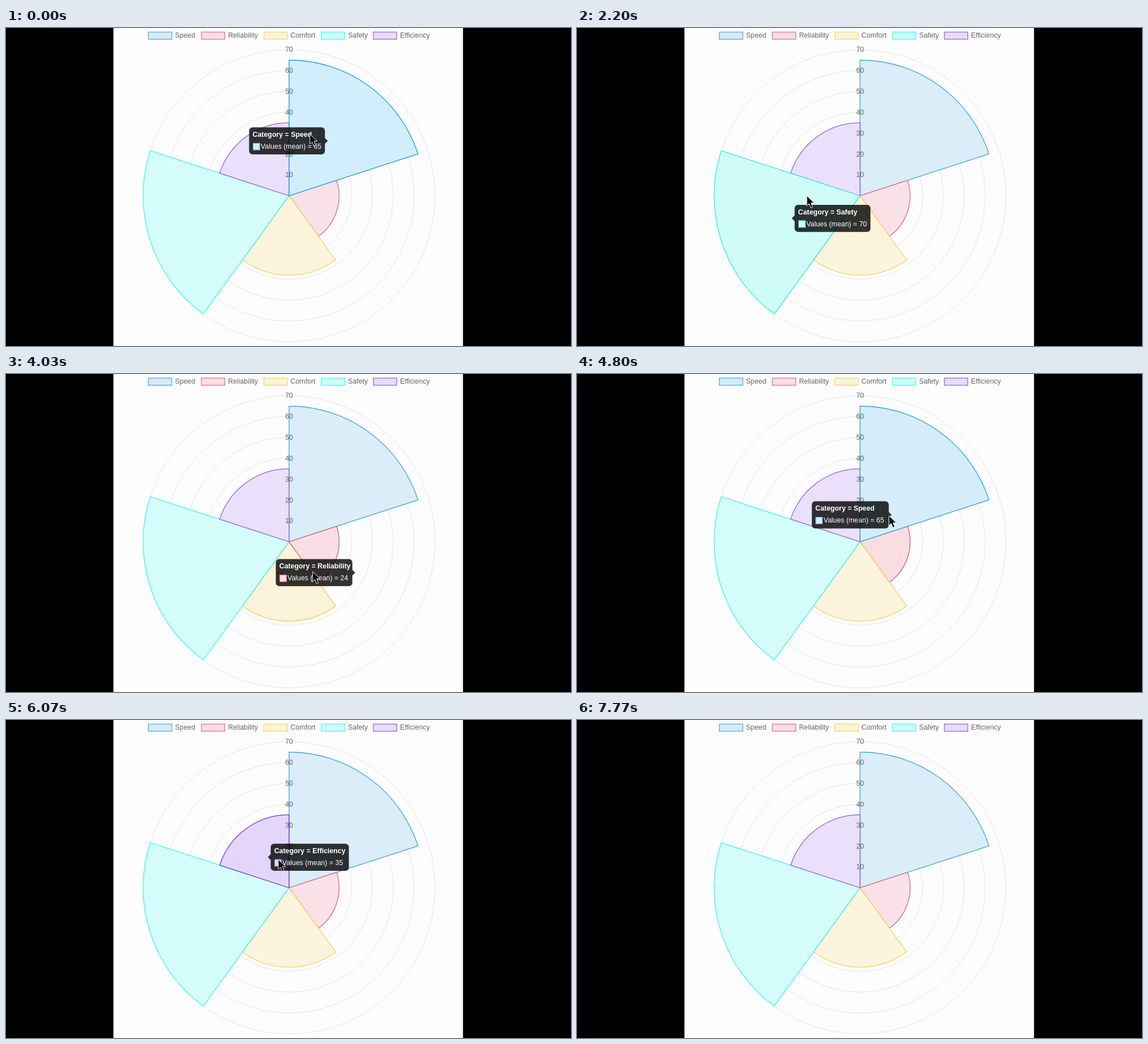
Write an HTML page that moves like this. It is 998x561 px and loops after 7800 ms.

```html
<!DOCTYPE html>
<html lang="en">
<head>
<meta charset="utf-8">
<title>Polar area chart</title>
<style>
  html, body { margin: 0; width: 100%; height: 100%; overflow: hidden; background: #000; }
  svg { display: block; width: 998px; height: 561px; }
  text { font: 12.35px "Liberation Sans", Arial, sans-serif; fill: #666; }
  .tip text { fill: #fff; }
  .tip .title { font-weight: bold; }
  .ring { fill: none; stroke: #000; stroke-opacity: .1; }
  .sector { stroke-width: 1.3; stroke-linejoin: bevel; }
</style>
</head>
<body>
<svg viewBox="0 0 998 561">
  <rect x="189.5" width="618" height="561" fill="#fdfdfd"/>
  <g id="legend"></g>
  <g id="rings"></g>
  <g id="sectors"></g>
  <g id="ticks" text-anchor="middle"></g>
  <g id="tip" class="tip">
    <path id="bubble" fill-opacity=".8"/>
    <text id="title" class="title" x="6.2" y="16.7"></text>
    <rect x="6.6" y="27.6" width="12.6" height="12.6" fill="#fff"/>
    <rect id="swatch" x="7.1" y="28.1" width="11.6" height="11.6"/>
    <text id="value" x="20.6" y="37.8"></text>
  </g>
  <path id="cursor" d="M0 0V17.5L4 13.8L7 21.2L10.3 19.8L7.4 12.6L12.8 12.3Z"
        fill="#0a0a0a" stroke="#fff" stroke-width=".9"/>
  <path d="M0 0H189.5V561H0ZM807.5 0H998V561H807.5Z"/>
</svg>
<script>
const LOOP = 7800, CX = 500, CY = 296, UNIT = 3.683, TIP_H = 47.8;

// fill and stroke: normal, then hovered
const sectors = [
  { name: 'Speed', value: 65, legendX: 251, fill: [[214, 235, 247], [204, 235, 253]], line: [[66, 165, 215], [26, 156, 222]] },
  { name: 'Reliability', value: 24, legendX: 344.6, fill: [[250, 221, 229], [251, 211, 217]], line: [[214, 110, 130], [204, 72, 104]] },
  { name: 'Comfort', value: 38, legendX: 455, fill: [[252, 243, 216], [251, 241, 212]], line: [[241, 211, 100], [238, 200, 60]] },
  { name: 'Safety', value: 70, legendX: 556.6, fill: [[208, 253, 252], [202, 252, 247]], line: [[64, 244, 236], [52, 235, 222]] },
  { name: 'Efficiency', value: 35, legendX: 648.4, fill: [[232, 220, 252], [225, 209, 251]], line: [[145, 98, 204], [108, 54, 200]] },
];

// [time, sector under the pointer], -1 for none
const hovers = [[-1000, 0], [150, 4], [1450, 3], [2930, 2], [4000, 1], [4728, 0],
  [5850, 4], [6790, 0], [6965, -1]];

// [time, x, y] of the pointer tip
const track = [[0, 537, 187], [150, 499, 211], [470, 486, 227], [1000, 447, 246],
  [1500, 419, 271], [2200, 406, 296], [2600, 416, 335], [2930, 455, 356], [3230, 463, 354],
  [3650, 500, 372], [4000, 539, 351], [4400, 564, 315], [4720, 556, 276], [4800, 551, 250],
  [5200, 553, 212], [5850, 500, 231], [6070, 481, 246], [6450, 456, 260], [6650, 460, 258],
  [6790, 500, 240], [6920, 640, 190], [6990, 740, 172], [7040, 840, 160]];

const $ = id => document.getElementById(id);
const lerp = (a, b, p) => a + (b - a) * p;
const easeOutQuart = p => 1 - (1 - p) ** 4;
const clamp = p => Math.max(0, Math.min(1, p));

function add(parent, tag, attrs, content = '') {
  const el = document.createElementNS('http://www.w3.org/2000/svg', tag);
  for (const key in attrs) el.setAttribute(key, attrs[key]);
  el.textContent = content;
  parent.append(el);
  return el;
}

function polar(deg, r) {
  const a = deg * Math.PI / 180;
  return [CX + r * Math.cos(a), CY + r * Math.sin(a)];
}

const mix = ([a, b], p) => `rgb(${a.map((v, i) => Math.round(lerp(v, b[i], p)))})`;

for (let v = 10; v <= 70; v += 10) {
  add($('rings'), 'circle', { class: 'ring', cx: CX, cy: CY, r: v * UNIT });
  add($('ticks'), 'text', { x: CX, y: CY - v * UNIT + 4.2 }, v);
}

sectors.forEach((s, i) => {
  const r = s.value * UNIT, from = i * 72 - 90;
  s.path = add($('sectors'), 'path', {
    class: 'sector', 'fill-opacity': .88,
    d: `M${CX} ${CY}L${polar(from, r)}A${r} ${r} 0 0 1 ${polar(from + 72, r)}Z`,
  });
  add($('legend'), 'rect', {
    x: s.legendX + .5, y: 7.2, width: 41.4, height: 12.6,
    fill: mix(s.fill, 0), stroke: mix(s.line, 0), 'stroke-width': 1.2,
  });
  add($('legend'), 'text', { x: s.legendX + 47.6, y: 17.4 }, s.name);

  // resting place of the tooltip
  const [x, y] = polar(from + 36, r / 2);
  setText(s);
  s.width = 12.4 + Math.max($('title').getComputedTextLength(),
    $('value').getComputedTextLength() + 14.4);
  s.onLeft = x <= CX + 1;
  s.tip = [s.onLeft ? x + 7 : x - 7 - s.width, y - TIP_H / 2, s.width];
});

function setText(s) {
  $('title').textContent = `Category = ${s.name}`;
  $('value').textContent = `Values (mean) = ${s.value}`;
}

// tooltip x, y, width, then the highlight of each sector
function goal(i) {
  const id = hovers[i][1];
  const tip = sectors[id < 0 ? hovers[i - 1][1] : id].tip;
  return [...tip, ...sectors.map((_, k) => +(k === id))];
}

function pose(i, t) {
  if (i === 0) return goal(0);
  const start = hovers[i][0], p = easeOutQuart(clamp((t - start) / 400));
  const before = pose(i - 1, start);
  return goal(i).map((v, k) => lerp(before[k], v, p));
}

function pointer(t) {
  const last = track.length - 1;
  const next = track.findIndex(p => p[0] > t);
  if (next < 0) return track[last].slice(1);
  const i = next - 1, a = track[i], b = track[next], span = b[0] - a[0];
  const p = (t - a[0]) / span;
  const slope = (k, axis) => {
    const l = track[Math.max(0, k - 1)], r = track[Math.min(last, k + 1)];
    return (r[axis] - l[axis]) / (r[0] - l[0]) * span;
  };
  return [1, 2].map(axis => {
    const d = b[axis] - a[axis], m = slope(i, axis), n = slope(next, axis);
    return a[axis] + p * (m + p * (3 * d - 2 * m - n + p * (m + n - 2 * d)));
  });
}

function bubble(w, onLeft) {
  const h = TIP_H, r = 6, mid = h / 2;
  const arc = (x, y) => `A${r} ${r} 0 0 1 ${x} ${y}`;
  const right = onLeft ? '' : `V${mid - 5}L${w + 5} ${mid}L${w} ${mid + 5}`;
  const left = onLeft ? `V${mid + 5}L-5 ${mid}L0 ${mid - 5}` : '';
  return `M${r} 0H${w - r}${arc(w, r)}${right}V${h - r}${arc(w - r, h)}` +
    `H${r}${arc(0, h - r)}${left}V${r}${arc(r, 0)}Z`;
}

let shown;
function draw(t) {
  const i = hovers.findLastIndex(h => h[0] <= t);
  const [start, id] = hovers[i];
  const s = sectors[id < 0 ? hovers[i - 1][1] : id];
  const [x, y, w, ...glow] = pose(i, t);

  if (shown !== i) {
    shown = i;
    setText(s);
    // the hovered sector lies on top
    const order = sectors.filter((_, k) => k !== id);
    if (id >= 0) order.push(s);
    $('sectors').append(...order.map(o => o.path));
  }
  sectors.forEach((o, k) => {
    o.path.setAttribute('fill', mix(o.fill, glow[k]));
    o.path.setAttribute('stroke', mix(o.line, glow[k]));
  });

  $('tip').setAttribute('transform', `translate(${x} ${y})`);
  $('tip').setAttribute('opacity', id < 0 ? 1 - clamp((t - start) / 200) : 1);
  $('bubble').setAttribute('d', bubble(w, s.onLeft));
  $('swatch').setAttribute('fill', mix(s.fill, 0));
  $('swatch').setAttribute('stroke', mix(s.line, 0));
  $('cursor').setAttribute('transform', `translate(${pointer(t)})`);
}

const begin = performance.now();
function tick() {
  draw((performance.now() - begin) % LOOP);
  requestAnimationFrame(tick);
}
tick();
</script>
</body>
</html>
```
